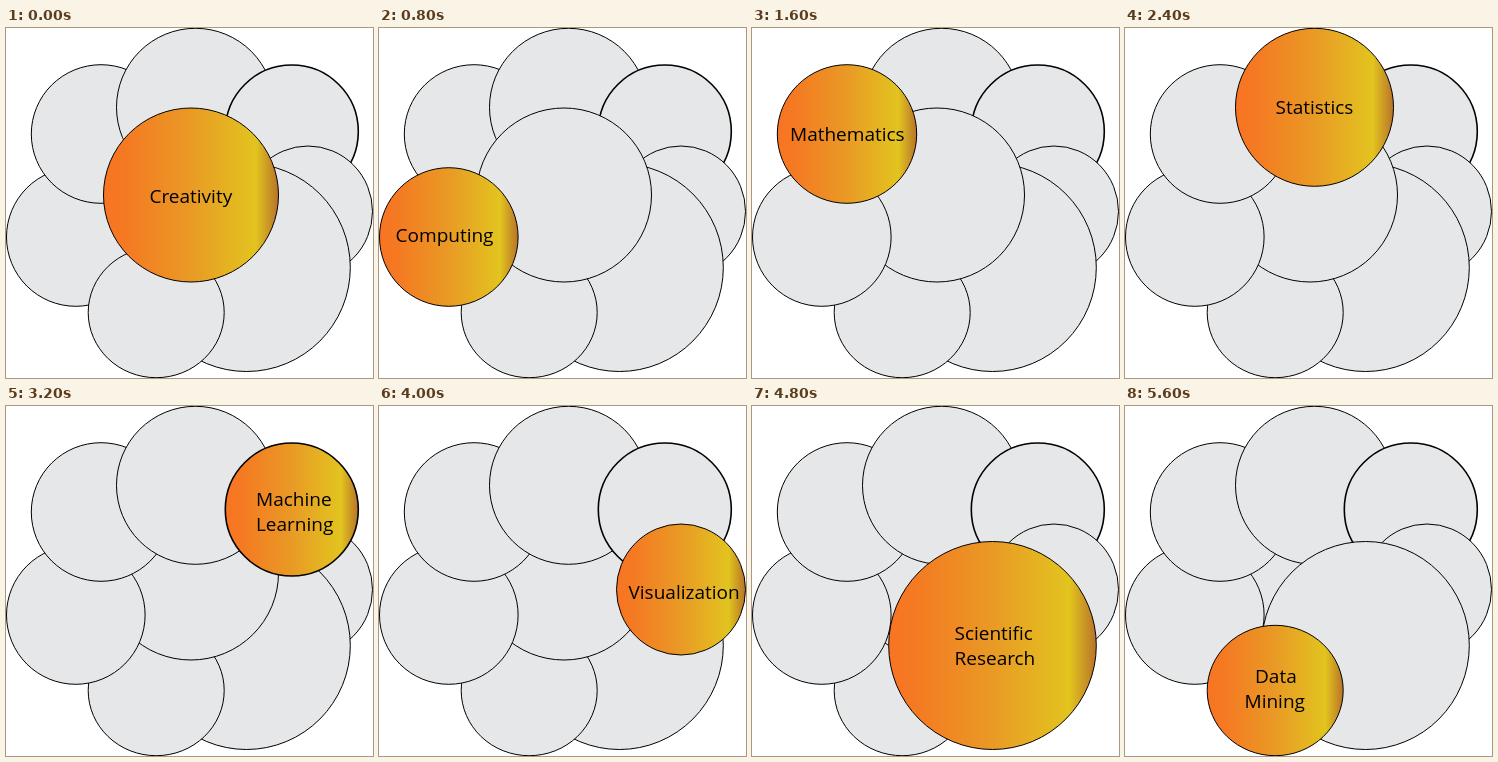
Recreate the animation shown at these times as an HTML page with a canvas. Size 367 by 350 pixels, loop 6.4 s.

```html
<!DOCTYPE html>
<html lang="en">
<head>
<meta charset="utf-8">
<title>Skill circles</title>
<style>
  html, body { margin: 0; width: 100%; height: 100%; overflow: hidden; background: #fff; }
  canvas { display: block; width: 367px; height: 350px; }
</style>
</head>
<body>
<canvas id="stage" width="367" height="350"></canvas>
<script>
const ctx = document.getElementById('stage').getContext('2d');
const STEP = 800;

// Listed in the order in which they light up; lines are [text, left, baseline].
const circles = [
  { x: 185, y: 167, rx: 87.5, ry: 87, lines: [['Creativity', 143.5, 175]] },
  { x: 69.8, y: 209, rx: 69.3, ry: 69.3, lines: [['Computing', 16.5, 214]] },
  { x: 95, y: 106, rx: 69.7, ry: 69.3, lines: [['Mathematics', 38, 113]] },
  { x: 189.5, y: 79.3, rx: 79, ry: 79, lines: [['Statistics', 150.5, 86]] },
  { x: 285.8, y: 103.5, rx: 66.5, ry: 66.5, stroke: 1.6,
    lines: [['Machine', 250, 100], ['Learning', 250, 125]] },
  { x: 302, y: 183.5, rx: 64.5, ry: 65.5, lines: [['Visualization', 249.5, 193]] },
  { x: 240.5, y: 239.5, rx: 103.8, ry: 104,
    lines: [['Scientific', 202.5, 234], ['Research', 202.5, 259]] },
  { x: 150.2, y: 284.5, rx: 68, ry: 65.2,
    lines: [['Data', 130, 277], ['Mining', 119.5, 302]] }
];

function glow({ x, rx }) {
  const fill = ctx.createLinearGradient(x - rx, 0, x + rx, 0);
  fill.addColorStop(0, '#f87423');
  fill.addColorStop(0.12, '#f57922');
  fill.addColorStop(0.5, '#e99a25');
  fill.addColorStop(0.87, '#e2c41f');
  fill.addColorStop(1, '#b87329');
  return fill;
}

function drawCircle(circle, active) {
  ctx.beginPath();
  ctx.ellipse(circle.x, circle.y, circle.rx, circle.ry, 0, 0, Math.PI * 2);
  ctx.fillStyle = active ? glow(circle) : '#e6e7e8';
  ctx.fill();
  ctx.lineWidth = circle.stroke || 1;
  ctx.strokeStyle = '#000';
  ctx.stroke();
  if (!active) return;
  ctx.fillStyle = '#000';
  ctx.font = '19px "Open Sans", "Noto Sans", sans-serif';
  for (const [text, left, baseline] of circle.lines) ctx.fillText(text, left, baseline);
}

function render(time) {
  const count = circles.length;
  const current = Math.floor(time / STEP) % count;
  ctx.fillStyle = '#fff';
  ctx.fillRect(0, 0, 367, 350);
  // The most recently lit circle lies on top of the earlier ones.
  for (let i = 1; i <= count; i++) {
    drawCircle(circles[(current + i) % count], i === count);
  }
}

const start = performance.now();
function tick() {
  render(performance.now() - start);
  requestAnimationFrame(tick);
}
tick();
</script>
</body>
</html>
```
